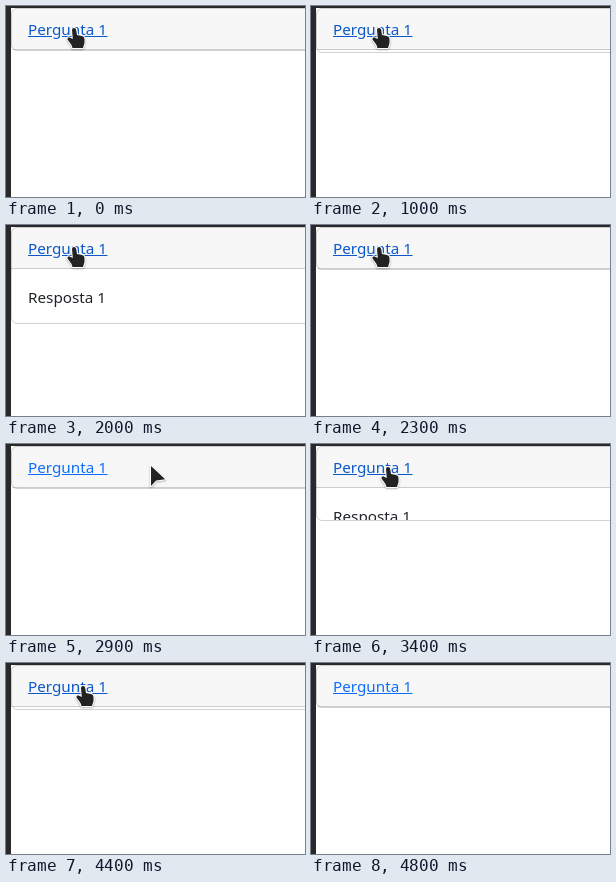
An HTML page with a canvas that plays this animation: 299 px wide and 191 px high, repeating every 5200 ms.

```html
<!DOCTYPE html>
<html lang="pt">
<head>
<meta charset="utf-8">
<title>Accordion</title>
<style>
  html, body { margin: 0; width: 100%; height: 100%; overflow: hidden; background: #fff; }
  canvas { display: block; }
</style>
</head>
<body>
<canvas id="stage" width="299" height="191"></canvas>
<script>
const ctx = document.getElementById('stage').getContext('2d');
const W = 299, H = 191, LOOP = 5200, STEP = 100;
const BODY = 56, SLIDE = 350;
const LINE = 'rgba(0,0,0,.175)';

// [start, opening]
const toggles = [[984, true], [1984, false], [3284, true], [4135, false]];

// [time, x, y, shape] of the pointer, held until the next entry
const moves = [
  [0, 68, 22, 'hand'],
  [2600, 116, 22, 'arrow'],
  [2700, 147, 22, 'arrow'],
  [2900, 145, 22, 'arrow'],
  [3000, 112, 22, 'arrow'],
  [3100, 77, 23, 'hand'],
  [4600, 58, 5, 'arrow'],
  [4700, 36, -15, 'arrow'],
  [4800, 0, 0, null]
];

const shapes = {
  arrow: new Path2D('M0 0V20L5.2 14.6L14.2 13.2Z'),
  hand: new Path2D('M-2 2Q-2 0 0 0Q2 0 2.2 2L3 7L8 8Q10.5 8.6 10.5 11V15L9 20H-1.5' +
    'L-2.5 17L-6.5 11.5Q-7 9.5-5 9.3L-1.2 11Z')
};

// CSS "ease": cubic-bezier(.25, .1, .25, 1)
function ease(x) {
  if (x <= 0) return 0;
  if (x >= 1) return 1;
  const curve = (s, a, b) => 3 * (1 - s) * (1 - s) * s * a + 3 * (1 - s) * s * s * b + s * s * s;
  let lo = 0, hi = 1;
  for (let i = 0; i < 24; i++) {
    const mid = (lo + hi) / 2;
    if (curve(mid, .25, .25) < x) lo = mid; else hi = mid;
  }
  return curve(lo, .1, 1);
}

function bodyHeight(t) {
  let h = 0;
  for (const [start, opening] of toggles) {
    if (t < start) break;
    const p = ease((t - start) / SLIDE);
    h = BODY * (opening ? p : 1 - p);
  }
  return Math.round(h);
}

function rect(x, y, w, h, color) {
  ctx.fillStyle = color;
  ctx.fillRect(x, y, w, h);
}

function text(str, y, color) {
  ctx.font = '15.25px "Noto Sans", "Open Sans", sans-serif';
  ctx.fillStyle = color;
  ctx.fillText(str, 22, y);
}

function drawCard(h, hover) {
  const bottom = 45 + h;
  ctx.save();
  ctx.beginPath();
  ctx.roundRect(5, 2, W + 20, bottom - 2, 6);
  ctx.clip();
  rect(5, 2, W, 42, '#f7f7f7');
  rect(5, 43, W, 1, LINE);
  rect(5, 44, W, h + 1, '#fff');
  ctx.beginPath();
  ctx.rect(5, 44, W, h);
  ctx.save();
  ctx.clip();
  text('Resposta 1', 78, '#212529');
  ctx.restore();
  ctx.restore();

  ctx.strokeStyle = LINE;
  ctx.lineWidth = 1;
  ctx.beginPath();
  ctx.roundRect(5.5, 2.5, W + 20, bottom - 3, 5.5);
  ctx.stroke();

  const color = hover ? '#0a58ca' : '#0d6efd';
  text('Pergunta 1', 29, color);
  // underline skips the descender
  rect(22, 30, 24, 1, color);
  rect(56, 30, 45.5, 1, color);
}

function drawPointer(x, y, shape) {
  ctx.save();
  ctx.translate(x, y);
  ctx.lineJoin = 'round';
  ctx.lineWidth = 2;
  ctx.strokeStyle = '#fff';
  ctx.shadowColor = 'rgba(0,0,0,.3)';
  ctx.shadowBlur = 2;
  ctx.shadowOffsetY = 1;
  ctx.stroke(shapes[shape]);
  ctx.shadowColor = 'transparent';
  ctx.fillStyle = '#222';
  ctx.fill(shapes[shape]);
  ctx.restore();
}

function draw(now) {
  const t = Math.floor((now % LOOP) / STEP) * STEP;
  const [, x, y, shape] = moves.filter(m => m[0] <= t).pop();
  rect(0, 0, W, H, '#fff');
  drawCard(bodyHeight(t), shape === 'hand');
  rect(0, 0, 5, H, '#292929');
  rect(0, 0, W, 2, '#292929');
  if (shape) drawPointer(x, y, shape);
}

const begin = performance.now();
function tick() {
  draw(performance.now() - begin);
  requestAnimationFrame(tick);
}
tick();
</script>
</body>
</html>
```
